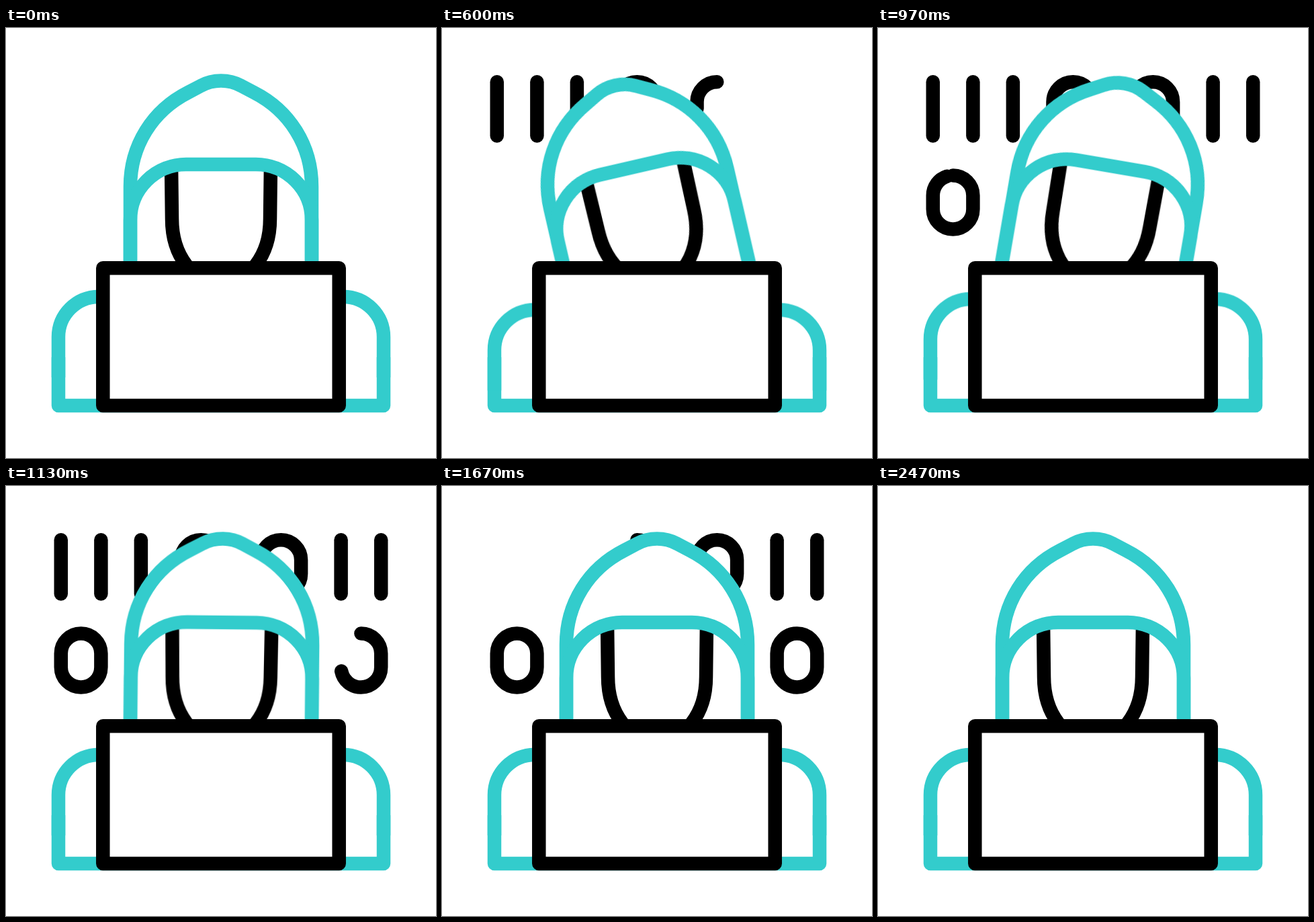
These frames come from a looping animation (640 px wide and 640 px high, 2500 ms). An HTML page without scripts:

```html
<!DOCTYPE html>
<html lang="en">
<head>
<meta charset="utf-8">
<title>Hooded figure at a laptop</title>
<style>
  /* Lengths along the whole row of digits: drawn so far, erased so far */
  @property --drawn  { syntax: "<length>"; inherits: true; initial-value: 0px; }
  @property --erased { syntax: "<length>"; inherits: true; initial-value: 0px; }

  html, body { margin: 0; width: 100%; height: 100%; overflow: hidden; background: #fff; }
  svg { display: block; width: 100%; height: 100%; }

  svg { fill: none; stroke-width: 20.5; stroke-linejoin: round; }
  .teal { stroke: #33cccc; }
  .ink { stroke: #000; }
  .solid { fill: #fff; }

  .digits, .head, .arms {
    animation: 2.5s cubic-bezier(.3333, 0, .6667, 1) infinite;
  }
  .digits { animation-name: draw, erase; stroke-linecap: round; }
  .head { animation-name: sway; transform-origin: 320px 357px; }
  .arms { animation-name: sink; }

  /* Each digit shows its own slice, from --a to --b; empty slices are pushed off the path */
  .digits use {
    --a: clamp(0px, var(--erased) - var(--start), var(--len));
    --b: clamp(0px, var(--drawn) - var(--start), var(--len));
    --shown: calc(var(--b) - var(--a));
    stroke-dasharray: var(--shown) 2000px;
    stroke-dashoffset: calc(min(500px, var(--shown) * 1000) - 500px - var(--a));
  }
  .one { --len: 80px; }
  .zero { --len: 228px; }

  @keyframes draw {
    0%, 2.4% { --drawn: 0px; }
    52.4%, 100% { --drawn: 1312px; }
  }
  @keyframes erase {
    0%, 50.4% { --erased: 0px; }
    98.8%, 100% { --erased: 1312px; }
  }
  @keyframes sway {
    0%, 1.32% { transform: rotate(0deg); }
    23.3% { transform: rotate(-13.3deg); }
    34.7% { transform: rotate(13.4deg); }
    46.7%, 100% { transform: rotate(0deg); }
  }
  @keyframes sink {
    0% { transform: translateY(0); }
    15.6% { transform: translateY(24px); }
    46%, 100% { transform: translateY(0); }
  }
</style>
</head>
<body>
<svg viewBox="0 0 640 640">
  <defs>
    <path id="one" pathLength="80" d="M0 0V80.2"/>
    <path id="zero-left" pathLength="228" d="M0 0a29.8 29.8 0 0 0-29.8 29.8v20.6a29.8 29.8 0 0 0 59.6 0v-20.6a29.8 29.8 0 0 0-29.8-29.8"/>
    <path id="zero-right" pathLength="228" d="M0 0a29.8 29.8 0 0 1 29.8 29.8v20.6a29.8 29.8 0 0 1-59.6 0v-20.6a29.8 29.8 0 0 1 29.8-29.8"/>
  </defs>

  <g class="digits ink">
    <use href="#one" class="one" x="81.8" y="80.3" style="--start:0px"/>
    <use href="#one" class="one" x="141.4" y="80.3" style="--start:80px"/>
    <use href="#one" class="one" x="200.9" y="80.3" style="--start:160px"/>
    <use href="#zero-left" class="zero" x="290.3" y="80.3" style="--start:240px"/>
    <use href="#zero-left" class="zero" x="409.3" y="80.3" style="--start:468px"/>
    <use href="#one" class="one" x="498.6" y="80.3" style="--start:696px"/>
    <use href="#one" class="one" x="558.2" y="80.3" style="--start:776px"/>
    <use href="#zero-right" class="zero" x="111.6" y="219.4" style="--start:856px"/>
    <use href="#zero-right" class="zero" x="528.4" y="219.4" style="--start:1084px"/>
  </g>

  <g class="teal">
    <path d="M78 490V562H562V490"/>
    <path class="arms" d="M150 400H138A60 60 0 0 0 78 460V520M490 400H502A60 60 0 0 1 562 460V520"/>
  </g>

  <g class="head">
    <path class="teal solid" d="M185 420V236C185 175 218 123 271 96L290 86C308 76 332 76 350 86L369 96C422 123 455 175 455 236V420"/>
    <path class="ink" d="M246 203L247 284C247 340 280 380 320 380S393 340 393 284L394 203"/>
    <path class="teal" d="M185 420V286A83 83 0 0 1 268 203H372A83 83 0 0 1 455 286V420"/>
  </g>

  <rect class="ink solid" x="144.3" y="357.2" width="351.4" height="204.8"/>
</svg>
</body>
</html>
```
